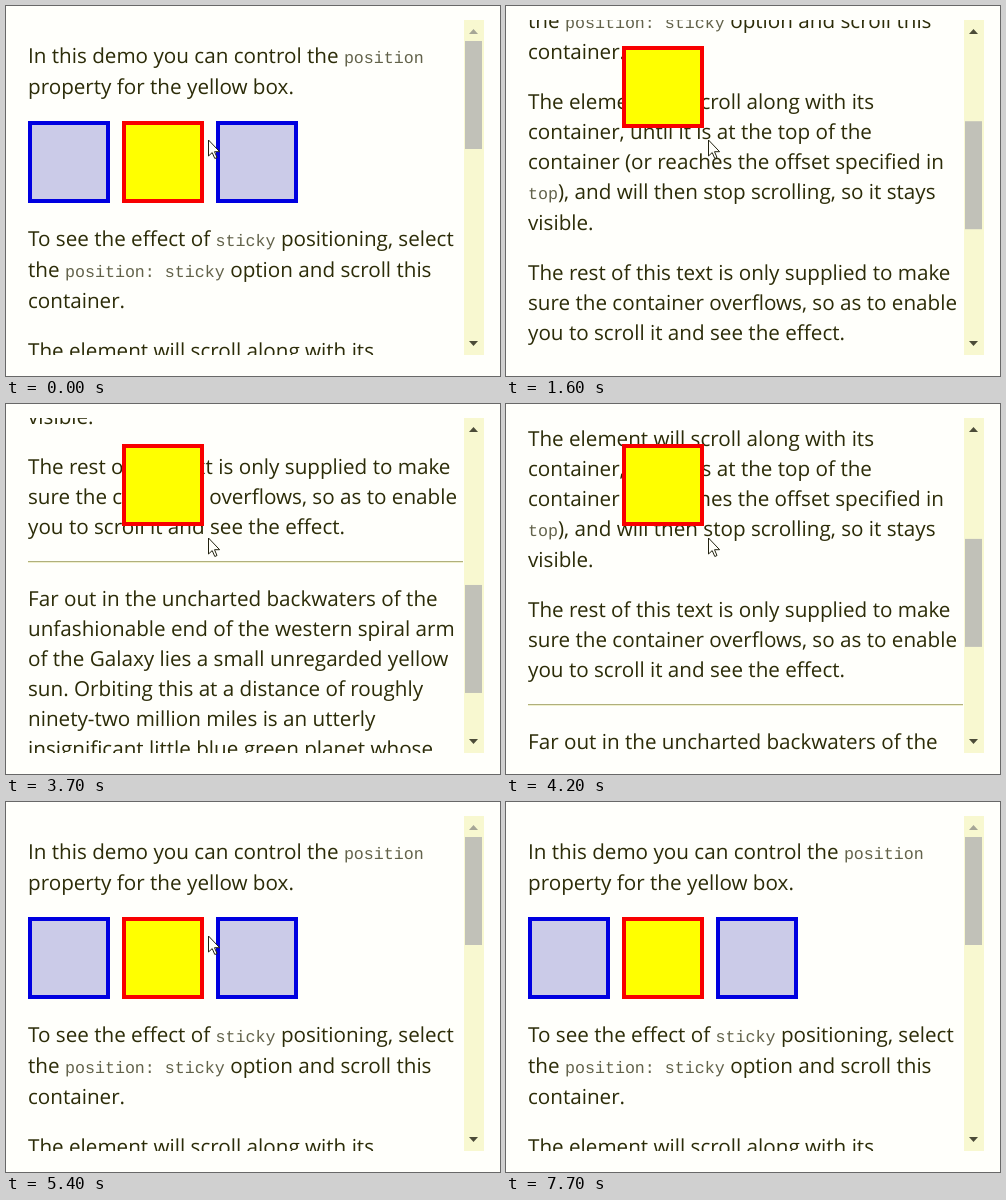
An HTML page that plays this animation: 494 px wide and 370 px high, repeating every 7800 ms.

```html
<!DOCTYPE html>
<html lang="en">
<head>
<meta charset="utf-8">
<title>Sticky positioning</title>
<style>
  html, body { margin: 0; width: 100%; height: 100%; overflow: hidden; }
  body {
    --scroll: 0;
    position: relative;
    background: #fffffb;
    color: #2c2c08;
    font: 20.65px/30px "Open Sans", "Noto Sans", sans-serif;
    text-rendering: geometricPrecision;
  }
  .stage { position: absolute; left: 0; top: 0; width: 494px; height: 370px; overflow: hidden; }
  .view { position: absolute; left: 0; top: 14px; width: 458px; height: 335px; overflow: hidden; }
  .page { position: absolute; left: 0; top: -14px; width: 458px; transform: translateY(calc(var(--scroll) * -1px)); }
  p, hr, .box { position: absolute; left: 22px; margin: 0; box-sizing: border-box; }
  p { white-space: nowrap; }
  code { font: 16.667px/25px "Liberation Mono", monospace; color: #62624a; }
  hr { top: 610px; width: 435px; height: 2px; border: 0; background: #f0f0cc; border-top: 1px solid #b0b07c; }
  .box { top: 115px; width: 82px; height: 82px; border: 4px solid #0000e0; background: #cbcbe8; }
  .third { left: 210px; }
  .sticky {
    left: 116px;
    top: max(26px, calc(101px - var(--scroll) * 1px));
    border-color: #f80000;
    background: #ff0;
  }
  .bar { position: absolute; left: 458px; top: 14px; width: 20px; height: 335px; background: #f8f8d0; }
  .thumb {
    position: absolute; left: 1px; top: 21px; width: 17px; height: 108px;
    background: #c1c1b8;
    transform: translateY(calc(var(--scroll) * .3222px));
  }
  .arrow { position: absolute; left: 5px; width: 9px; height: 5px; background: #4c4c38; }
  .up { top: 9px; clip-path: polygon(50% 0, 100% 100%, 0 100%); }
  .down { top: 321px; clip-path: polygon(0 0, 100% 0, 50% 100%); }
  .at-top .up { background: #a6a696; }
  .cursor { position: absolute; left: 202px; top: 133px; }
</style>
</head>
<body>
<div class="stage">
  <div class="view">
    <div class="page">
      <p style="top:35px">In this demo you can control the <code>position</code><br>
        property for the yellow box.</p>
      <div class="box"></div>
      <div class="box third"></div>
      <p style="top:218px">To see the effect of <code>sticky</code> positioning, select<br>
        the <code>position: sticky</code> option and scroll this<br>
        container.</p>
      <p style="top:330px">The element will scroll along with its<br>
        container, until it is at the top of the<br>
        container (or reaches the offset specified in<br>
        <code>top</code>), and will then stop scrolling, so it stays<br>
        visible.</p>
      <p style="top:501px">The rest of this text is only supplied to make<br>
        sure the container overflows, so as to enable<br>
        you to scroll it and see the effect.</p>
      <hr>
      <p style="top:633px">Far out in the uncharted backwaters of the<br>
        unfashionable end of the western spiral arm<br>
        of the Galaxy lies a small unregarded yellow<br>
        sun. Orbiting this at a distance of roughly<br>
        ninety-two million miles is an utterly<br>
        insignificant little blue green planet whose<br>
        ape-descended life forms are so amazingly<br>
        primitive that they still think digital</p>
    </div>
    <div class="box sticky"></div>
  </div>
  <div class="bar">
    <div class="arrow up"></div>
    <div class="thumb"></div>
    <div class="arrow down"></div>
  </div>
  <svg class="cursor" width="14" height="22" viewBox="0 0 14 22">
    <path d="M.5 1V17L4.2 13.6 6.8 19.5 9 18.5 6.5 12.7H11.6Z" fill="#fffffa" stroke="#222210"/>
  </svg>
</div>
<script>
  const LOOP = 7800, CURSOR_GONE = 5600;
  // [time in ms, scroll offset held from then on]
  const stops = [
    [0, 0], [600, 50], [700, 125],
    [1500, 180], [1600, 249], [1700, 250],
    [2300, 310], [2400, 375],
    [3000, 435], [3100, 500],
    [3700, 453], [3800, 375],
    [4200, 310], [4300, 250],
    [4600, 185], [4700, 125],
    [5200, 60], [5300, 0]
  ];
  const body = document.body;
  const cursor = document.querySelector(".cursor");
  const start = performance.now();

  function draw() {
    const t = (performance.now() - start) % LOOP;
    const scroll = stops.findLast(([time]) => time <= t)[1];
    body.style.setProperty("--scroll", scroll);
    body.classList.toggle("at-top", scroll === 0);
    cursor.style.visibility = t < CURSOR_GONE ? "visible" : "hidden";
    requestAnimationFrame(draw);
  }
  draw();
</script>
</body>
</html>
```
